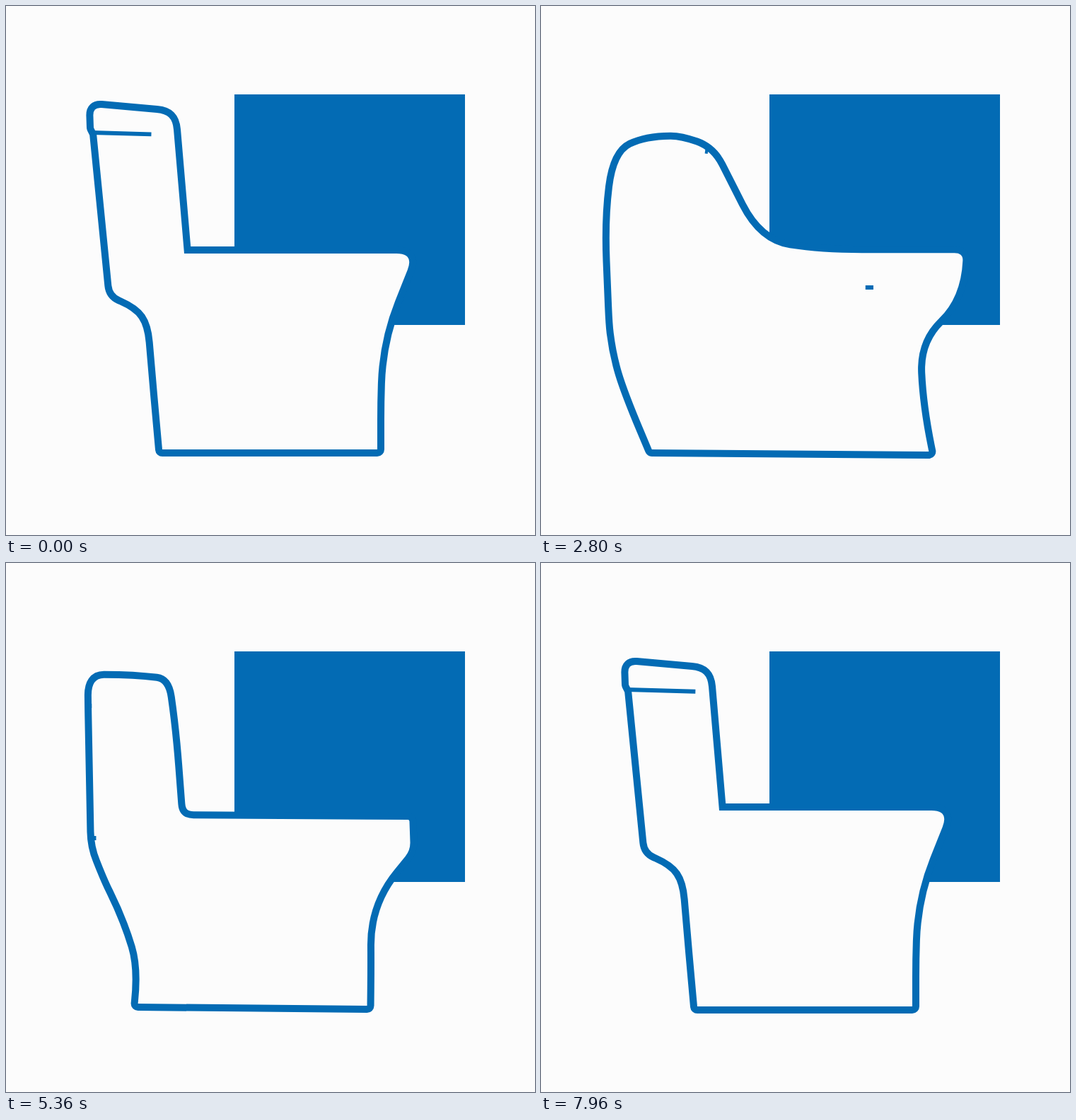
These frames come from a looping animation (748 by 748 pixels, 8000 ms). An HTML page:

```html
<!DOCTYPE html>
<html lang="en">
<head>
<meta charset="utf-8">
<title>Toilet shapes</title>
<style>
  html, body { margin: 0; width: 100%; height: 100%; overflow: hidden; background: #fcfcfc; }
  svg { display: block; width: 100vw; height: 100vh; }
  #body { fill: #fcfcfc; stroke: #036bb4; stroke-width: 20; stroke-linejoin: round; paint-order: stroke; }
  #lines { fill: none; stroke: #036bb4; stroke-width: 5.8; }
</style>
</head>
<body>
<svg viewBox="0 0 748 748">
  <path fill="#036bb4" d="M323 125H649V451H323z"/>
  <path id="body"/>
  <g id="lines"></g>
</svg>
<script>
const LOOP = 8000, FIRST = 500, STEP = 1500, MORPH = 1000, DRAW = 500;

// Key corners, clockwise from the tank's top left; a letter rounds the corner.
const RADIUS = { "": 0, a: 12, b: 25, c: 60 };
const poses = [
  "123,143a 225,152a 236,163a 252,350 577,350b 561,390 528,473c 525,560b 525,627 221,627 214,549 205.5,450b 187,423b 150.5,407a 128,180 124,172",
  "119,142b 226,143b 248,158b 261,354 593,353b 589,412c 503,490c 514,560b 528,630 150,627 136,555b 116,474a 107,441a 99,383a 100,377 108,158b",
  "200,190b 241,206b 309,341c 400,349c 597,349a 594,412c 532,472c 536,565c 549,630 157,627 122,545c 106,492c 101,450b 95,300c 107,204c 150,190c",
  "189,173c 230,178b 237,255c 240,363b 567,365 570,402 509,485c 503,570b 503,626 193,623 198,570c 182,495c 147,443b 129,402b 124,213 123,170b",
  "150,119c 207,127b 228,150b 266,353 585,355a 580,423c 518,463c 546,598b 543,626 159,623 166,584 124,538c 134,476 107,394 109,200 110,131b"
].map(text => text.split(" ").map(corner => {
  const [, x, y, size] = corner.match(/([\d.]+),([\d.]+)(\w?)/);
  return [+x, +y, RADIUS[size]];
}));

// Detail lines: when drawing starts, when erasing starts and ends, then the paths.
const details = [
  [7000, 7900, 8260, "M238 182.3L122 179"],
  [1000, 2010, 2495, "M262 327H100", "M374 396.5H100", "M279 399C279 460 340 478 398 501"],
  [2740, 3510, 3745, "M236 206Q165 197 103 211"],
  [2740, 3510, 3850, "M470 398H93"],
  [4020, 5010, 5368, "M234 202H119", "M400 389H122"],
  [5500, 6370, 6740, "M228 153.3H110", "M264 340.3H108",
    "M315 427C331 465 365 470 381 477C398 484 406 494 402 511", "M419 488Q470 498 516 481"]
].flatMap(([start, out, end, ...paths]) => paths.map(d => ({ start, out, end, el: addLine(d) })));

function addLine(d) {
  const el = document.createElementNS("http://www.w3.org/2000/svg", "path");
  el.setAttribute("d", d);
  el.setAttribute("pathLength", 1);
  document.getElementById("lines").append(el);
  return el;
}

const clamp = v => Math.min(1, Math.max(0, v));
const mix = (a, b, u) => a + (b - a) * u;
const easeInOut = (u, power) =>
  u < .5 ? (2 * u) ** power / 2 : 1 - (2 - 2 * u) ** power / 2;

// Where the rounding of corner p ends on its edge to q; neighbours share a short edge.
function roundEnd(p, q) {
  const length = Math.hypot(q[0] - p[0], q[1] - p[1]);
  const u = p[2] / Math.max(length, p[2] + q[2], 1);
  return [mix(p[0], q[0], u).toFixed(2), mix(p[1], q[1], u).toFixed(2)];
}

function outline(corners) {
  const n = corners.length;
  return corners.map((p, i) => {
    const before = roundEnd(p, corners[(i + n - 1) % n]);
    const after = roundEnd(p, corners[(i + 1) % n]);
    return `${i ? "L" : "M"}${before}Q${p[0].toFixed(2)},${p[1].toFixed(2)} ${after}`;
  }).join("") + "Z";
}

function draw(t) {
  const k = Math.max(0, Math.floor((t - FIRST) / STEP));
  const u = easeInOut(clamp((t - FIRST - k * STEP) / MORPH), 3);
  const next = poses[(k + 1) % poses.length];
  const corners = poses[k].map((p, i) => p.map((v, j) => mix(v, next[i][j], u)));
  document.getElementById("body").setAttribute("d", outline(corners));

  for (const { start, out, end, el } of details) {
    const now = start + (t - start + LOOP) % LOOP;
    const head = easeInOut(clamp((now - start) / DRAW), 2);
    const tail = clamp((now - out) / (end - out));
    el.style.visibility = head > tail ? "visible" : "hidden";
    el.style.strokeDasharray = `0 ${tail} ${Math.max(0, head - tail)} 9`;
  }
}

const begin = performance.now();
function tick() {
  draw((performance.now() - begin) % LOOP);
  requestAnimationFrame(tick);
}
tick();
</script>
</body>
</html>
```
